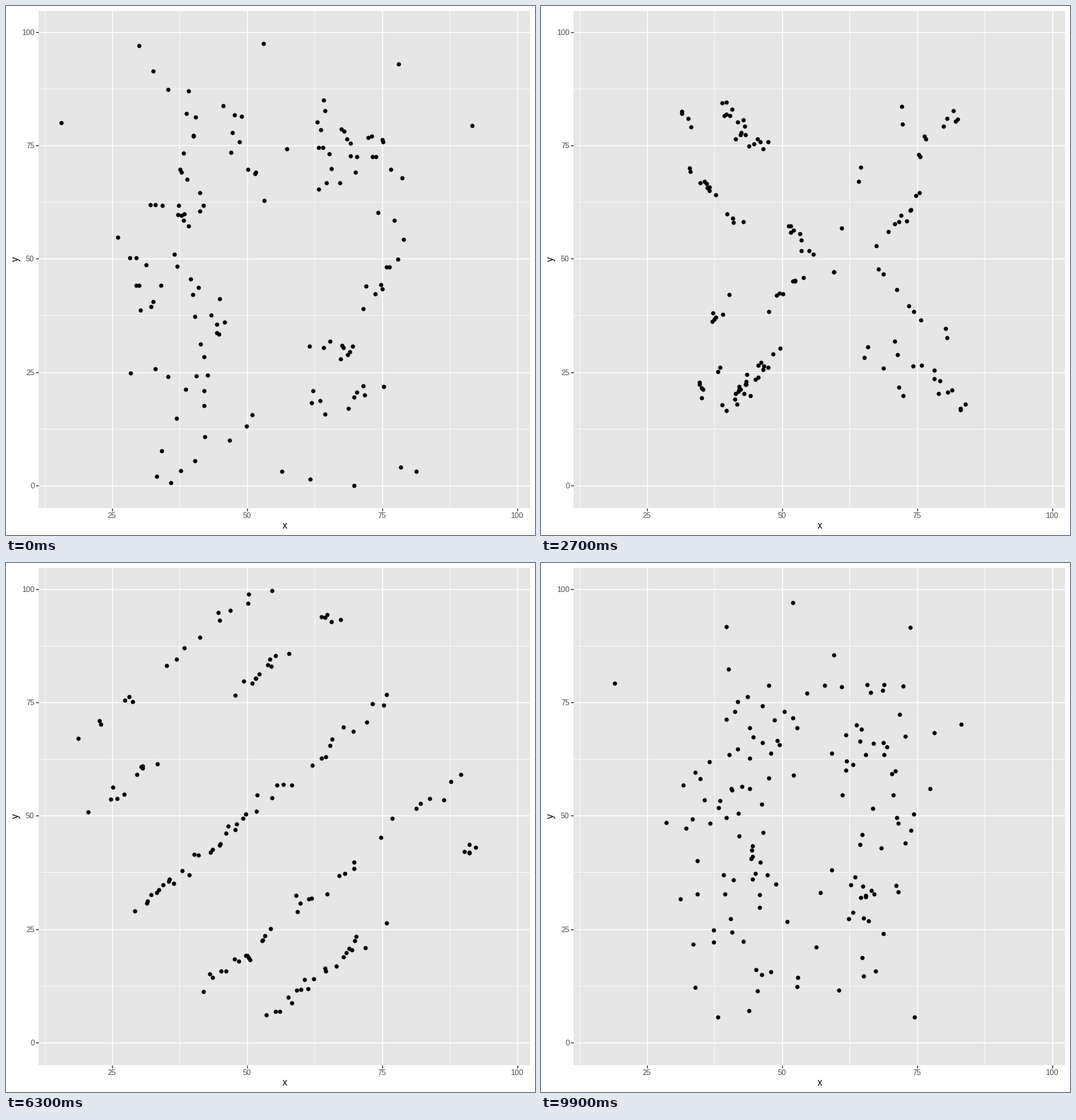
A matplotlib script that plays this animation: 748x748 px, repeating every 10000 ms.

```python
import matplotlib.pyplot as plt
import numpy as np
from matplotlib.animation import FuncAnimation

SIZE, DPI = 748, 64
PX = 72 / DPI  # points per pixel
CENTER = np.array([54.3, 47.8])
rng = np.random.default_rng(7)

# Strokes: number of dots, then the corners they are spread along.
DINOSAUR = [
    (31, (55, 97), (46, 94.5), (34, 78), (23, 66.5), (22.3, 57), (26, 51),
     (38, 51), (56.7, 56), (61.8, 69)),
    (15, (57.4, 55.3), (48, 38.3), (35, 30.3), (30, 36.8), (38.2, 49.1)),
    (24, (29.7, 36), (36, 25.3), (44, 25.6), (55, 40.6), (68, 48),
     (71.5, 61), (69.5, 69.5)),
    (11, (47, 80), (50, 85.3), (56.7, 86), (52, 78.7), (48, 77.6)),
    (3, (29.7, 60), (31.3, 62.6)),
    (20, (57.9, 99.5), (65, 97.6), (72, 86.4), (86.4, 47.6), (98.2, 33.7)),
    (6, (56.7, 40.6), (64.4, 24)),
    (12, (74.4, 23), (52.3, 18.3), (45, 13.7)),
    (8, (48.7, 15), (56.2, 14), (46.2, 6)),
    (9, (50.5, 9.5), (78.2, 10.6)),
    (3, (68, 8.7), (68.2, 3)),
]
SCATTER = [
    (2, (15.6, 80), (91.6, 79.4)),
    (2, (53, 97.5), (78, 93)),
    (4, (30, 96.6), (39, 85)),
    (12, (39.5, 83), (41.5, 58)),
    (10, (47, 85), (49, 72), (52, 64.6)),
    (8, (32, 61), (40.5, 60)),
    (12, (28, 56), (31, 38), (36.5, 50)),
    (12, (40, 44), (46, 36), (42, 30)),
    (9, (28, 26), (46, 23), (42, 13)),
    (9, (35, 12.6), (33, 0.5), (52, 16)),
    (11, (65, 85), (65, 78), (76, 76)),
    (12, (59, 76), (72, 72), (62, 64)),
    (6, (75.7, 74), (76, 60)),
    (9, (79, 53), (73, 40)),
    (9, (63, 32), (70, 29)),
    (10, (62, 21.5), (74, 22), (66, 15)),
    (5, (57.5, 1.5), (82, 2)),
]


def trace(strokes):
    """Spread dots evenly along every stroke."""
    parts = []
    for count, *corners in strokes:
        x, y = np.array(corners).T
        along = np.append(0, np.hypot(np.diff(x), np.diff(y)).cumsum())
        spots = np.linspace(0, along[-1], count)
        parts.append(np.column_stack([np.interp(spots, along, x),
                                      np.interp(spots, along, y)]))
    return np.vstack(parts)


dino = trace(DINOSAUR)
COUNT = len(dino)


def noise(sd):
    return rng.normal(0, sd, (COUNT, 2))


def bounded(points):
    return np.clip(points, (18, 0.3), (98.2, 99.6))


def snap(segments, jitter, wander=2.0):
    """Move each dinosaur dot to the nearest place on the segments."""
    points = bounded(dino + noise(wander))
    found = []
    for a, b in np.array(segments, float):
        d = b - a
        t = np.clip((points - a) @ d / max(d @ d, 1e-9), 0, 1)
        found.append(a + t[:, None] * d)
    found = np.array(found)
    nearest = np.linalg.norm(found - points, axis=2).argmin(axis=0)
    return bounded(found[nearest, np.arange(COUNT)] + noise(jitter))


def rings(radii, jitter):
    offset = dino + noise(2) - CENTER
    distance = np.linalg.norm(offset, axis=1)
    radius = np.array(radii)[abs(distance[:, None] - radii).argmin(axis=1)]
    aim = offset * (1, 1.4)
    aim /= np.linalg.norm(aim, axis=1)[:, None]
    return CENTER + aim * radius[:, None] + noise(jitter)


def bands(points, axis, split, low, high):
    """Squeeze one coordinate into two broad bands."""
    out = points + noise(2)
    value = points[:, axis]
    middle = np.where(value < split, low, high)
    out[:, axis] = middle + 0.22 * (value - middle) + rng.normal(0, 1.8, COUNT)
    return bounded(out)


def star_edges():
    k = np.arange(11)
    angle = np.pi / 2 + k * np.pi / 5
    reach = np.where(k % 2, 0.38, 1)
    tips = np.column_stack([57 + 31 * reach * np.cos(angle),
                            50 + 42 * reach * np.sin(angle)])
    return list(zip(tips, tips[1:]))


away = trace(SCATTER)
away[4:] += rng.normal(0, 1.5, (COUNT - 4, 2))
away = np.clip(rng.permutation(away), (15.6, 0), (91.6, 97.5))
v_lines = snap([((x, 0), (x, 100)) for x in (30.5, 50.4, 69.5, 89.5)], 0.15, 2.5)
states = [
    away,
    rings([18, 37], 0.8),
    rings([30.8], 0.9),
    snap([((20, 0), (98, 97.5)), ((20, 100), (98, 2.5))], 1.3),
    snap([((x, y),) * 2 for x in (25.5, 50.8, 75.5) for y in (17, 51.2, 82.8)], 0.2),
    snap([((0, y), (100, y)) for y in (10.5, 30.5, 50.5, 70.4, 90.3)], 0.15, 2.5),
    bands(dino, 1, 48, 22, 74),
    snap([((c - 100, 100), (c, 0)) for c in (50, 70, 100, 130, 151)], 0.8),
    snap([((0, c), (100, 100 + c)) for c in (48, 29, 0, -30, -48.5)], 0.8),
    snap(star_edges(), 0.5),
    v_lines,
    bands(v_lines, 0, 52, 34, 68),
    dino,
    away,
]
starts = [2 + 8 * k for k in range(11)] + [89, 96]
lengths = [6] * 10 + [5] * 3

plt.rcParams["font.family"] = "Liberation Sans"
fig = plt.figure(figsize=(SIZE / DPI, SIZE / DPI), dpi=DPI, facecolor="white")
LEFT, TOP, WIDTH, HEIGHT = 46.3, 6.9, 695, 702.7
ax = fig.add_axes([LEFT / SIZE, 1 - (TOP + HEIGHT) / SIZE, WIDTH / SIZE, HEIGHT / SIZE],
                  facecolor="#e6e6e6")
ax.set(xlim=(11.42, 102.43), ylim=(-4.97, 104.68))
ax.set_xticks(range(25, 101, 25))
ax.set_yticks(range(0, 101, 25))
ax.set_xticks(np.arange(12.5, 100, 25), minor=True)
ax.set_yticks(np.arange(12.5, 100, 25), minor=True)
ax.set_axisbelow(True)
ax.grid(which="major", color="white", linewidth=1.4 * PX)
ax.grid(which="minor", color="white", linewidth=0.7 * PX)
ax.tick_params(which="minor", length=0)
ax.tick_params(which="major", length=3.6 * PX, width=1.3 * PX, pad=2.4 * PX,
               color="#333333", labelcolor="#4d4d4d", labelsize=11 * PX)
for spine in ax.spines.values():
    spine.set_visible(False)
title = dict(ha="center", va="center", fontsize=13.5 * PX, color="black")
fig.text(394 / SIZE, 1 - 735 / SIZE, "x", **title)
fig.text(13.5 / SIZE, 1 - 358 / SIZE, "y", rotation=90, **title)

dots, = ax.plot([], [], "o", color="black", markersize=6 * PX, markeredgewidth=0)


def update(frame):
    points = states[0]
    for k, (start, length) in enumerate(zip(starts, lengths)):
        if frame >= start:
            t = min((frame - start + 1) / length, 1)
            points = states[k] * (1 - t) + states[k + 1] * t
    dots.set_data(points[:, 0], points[:, 1])
    return dots,


animation = FuncAnimation(fig, update, frames=100, interval=100, repeat=True)
plt.show()
```
